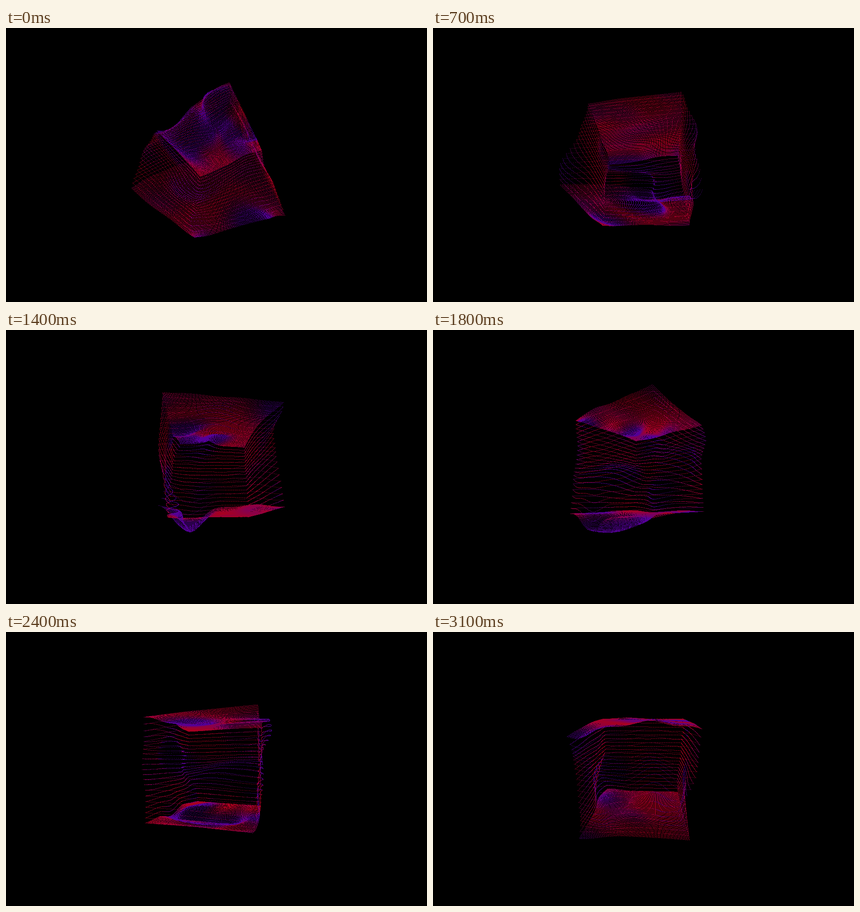
Recreate the animation shown at these times as an HTML page with a canvas. Size 920x600 px, loop 3.2 s.

```html
<!DOCTYPE html>
<html lang="en">
<head>
<meta charset="utf-8">
<title>Point cube</title>
<style>
  html, body { margin: 0; width: 100%; height: 100%; overflow: hidden; background: #000; }
  canvas { display: block; }
</style>
</head>
<body>
<canvas id="stage" width="920" height="600"></canvas>
<script>
const WIDTH = 920, HEIGHT = 600, LOOP = 3200, STEP = 100;
const CENTER_X = 451, CENTER_Y = 298, FOCAL = 398, DISTANCE = 2;
const WAVES = 4, SWELL = 0.026, FULL_TINT = 0.08;
const CALM = [168, 0, 30], DISPLACED = [84, 0, 150];
const ctx = document.getElementById('stage').getContext('2d');
const image = ctx.createImageData(WIDTH, HEIGHT);
const pixels = new Uint32Array(image.data.buffer);

let seed = 11;
function random(low, high) {
  seed = (seed * 16807) % 2147483647;
  return low + (high - low) * seed / 2147483647;
}

// A wave with a random direction, length, drift and phase
function makeWave() {
  const height = random(-1, 1), angle = random(0, 2 * Math.PI);
  const flat = Math.sqrt(1 - height * height), pitch = random(5, 9);
  return {
    x: pitch * flat * Math.cos(angle), y: pitch * height, z: pitch * flat * Math.sin(angle),
    drift: random(-3, 3), phase: random(0, 2 * Math.PI)
  };
}

const axes = Array.from({ length: 3 }, () => Array.from({ length: WAVES }, makeWave));

// Cubing the sum keeps most of the surface flat and leaves a few strong bumps
function swell(waves, x, y, z, time) {
  let sum = 0;
  for (const w of waves) sum += Math.sin(w.x * x + w.y * y + w.z * z + w.drift * time + w.phase);
  return SWELL * (sum / 2) ** 3;
}

function poseAt(time) {
  const turn = (time < 0.4 ? 0.1 + 0.75 * time : time) - 0.4;
  const yaw = (-63.1 - 111.8 * turn) * Math.PI / 180;
  const pitch = (42.3 - 22.36 * turn) * Math.PI / 180;
  return { cy: Math.cos(yaw), sy: Math.sin(yaw), cp: Math.cos(pitch), sp: Math.sin(pitch) };
}

function project(x, y, z, pose) {
  const right = x * pose.cy + z * pose.sy;
  const near = z * pose.cy - x * pose.sy;
  const scale = FOCAL / (DISTANCE - near * pose.cp + y * pose.sp);
  return [CENTER_X + right * scale, CENTER_Y - (y * pose.cp + near * pose.sp) * scale];
}

function buildPoints() {
  const points = [], fine = 100, coarse = 20;
  for (let i = 0; i <= fine; i++) {
    const u = i / fine - 0.5;
    for (let j = 0; j <= fine; j++) {
      const v = j / fine - 0.5;
      points.push([u, 0.5, v], [u, -0.5, v]);
    }
    for (let j = 0; j <= coarse; j++) {
      const y = j / coarse - 0.5;
      points.push([u, y, 0.5], [u, y, -0.5], [0.5, y, u], [-0.5, y, u]);
    }
  }
  return points;
}

const points = buildPoints();

function colour(tint) {
  const [red, green, blue] = CALM.map((c, i) => Math.round(c + (DISPLACED[i] - c) * tint));
  return 0xff000000 | blue << 16 | green << 8 | red;
}

function draw(time) {
  const pose = poseAt(time);
  pixels.fill(0xff000000);
  for (const [x, y, z] of points) {
    const [dx, dy, dz] = axes.map(waves => swell(waves, x, y, z, time));
    const [px, py] = project(x + dx, y + dy, z + dz, pose);
    const tint = Math.min(1, Math.hypot(dx, dy, dz) / FULL_TINT);
    pixels[Math.round(py) * WIDTH + Math.round(px)] = colour(tint);
  }
  ctx.putImageData(image, 0, 0);
}

const start = performance.now();
let shown = -1;
function tick() {
  const step = Math.floor((performance.now() - start) % LOOP / STEP);
  if (step !== shown) {
    shown = step;
    draw(step * STEP / 1000);
  }
  requestAnimationFrame(tick);
}
tick();
</script>
</body>
</html>
```
